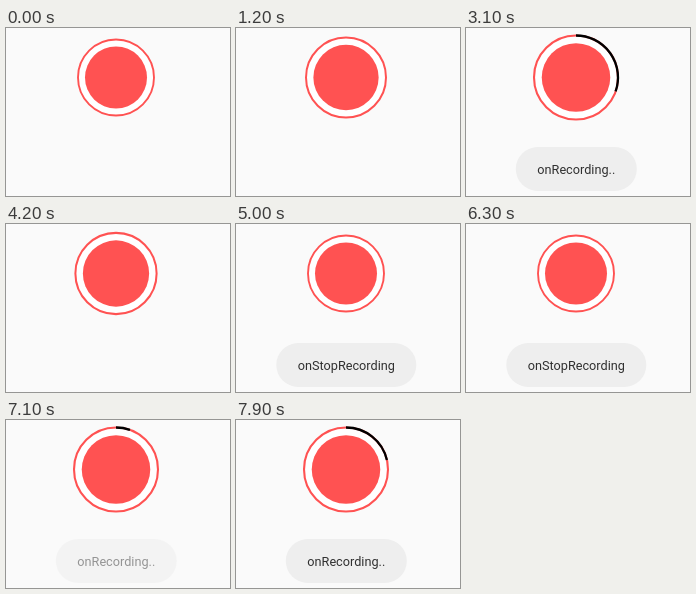
Write an HTML page that moves like this. It is 224 px wide and 168 px high and loops after 8 s.

```html
<!DOCTYPE html>
<html lang="en">
<head>
<meta charset="utf-8">
<title>Record button</title>
<style>
  html, body { margin: 0; width: 100%; height: 100%; overflow: hidden; background: #fafafa; }
  svg { display: block; width: 100vw; height: 100vh; }
  text { font: 12.7px Roboto, sans-serif; text-anchor: middle; fill: #303030; }
</style>
</head>
<body>
<svg viewBox="0 0 224 168">
  <g id="button">
    <circle r="38" fill="#fff" stroke="#ff5252" stroke-width="1.9"/>
    <circle r="31" fill="#ff5252"/>
    <path id="arc" fill="none" stroke="#000" stroke-width="2.1"/>
  </g>
  <g id="toast">
    <rect id="pill" y="119" height="44" rx="22" fill="#eee"/>
    <text id="label" x="110.3" y="145.6"></text>
  </g>
</svg>
<script>
const LOOP = 8000, TICK = 100, MAX_RECORDING = 5000, FADE = 400;
const PRESSED_SCALE = 1.105, RING = 38;

const presses = [
  { down: 1100, record: 1580, up: 4120 },
  { down: 6350, record: 6830, up: Infinity },
];
const toasts = [
  { text: 'onRecording..', width: 121, show: 1650, hide: 3750 },
  { text: 'onStopRecording', width: 140, show: 4250, hide: 6350 },
  { text: 'onRecording..', width: 121, show: 6900, hide: Infinity },
];

const el = id => document.getElementById(id);
const ramp = (t, start, length) => Math.min(1, Math.max(0, (t - start) / length));
const smooth = x => (1 - Math.cos(Math.PI * x)) / 2;

function drawButton(t) {
  let pressed = 0, sweep = 0;
  for (const { down, record, up } of presses) {
    pressed += smooth(ramp(t, down, 200)) - smooth(ramp(t, up, 200));
    if (t > record && t < up) sweep = (t - record) / MAX_RECORDING * 2 * Math.PI;
  }
  const scale = 1 + (PRESSED_SCALE - 1) * pressed;
  el('button').setAttribute('transform', `translate(110 49.5) scale(${scale})`);
  const x = RING * Math.sin(sweep), y = -RING * Math.cos(sweep);
  const large = sweep > Math.PI ? 1 : 0;
  el('arc').setAttribute('d', sweep ? `M0 ${-RING}A${RING} ${RING} 0 ${large} 1 ${x} ${y}` : '');
}

function drawToast(t) {
  const toast = toasts.find(({ show, hide }) => t > show && t < hide + FADE);
  el('toast').setAttribute('opacity',
    toast ? ramp(t, toast.show, FADE) - ramp(t, toast.hide, FADE) : 0);
  if (!toast) return;
  el('label').textContent = toast.text;
  el('pill').setAttribute('width', toast.width);
  el('pill').setAttribute('x', 110.3 - toast.width / 2);
}

function frame() {
  const t = Math.floor(performance.now() % LOOP / TICK) * TICK;
  drawButton(t);
  drawToast(t);
  requestAnimationFrame(frame);
}
frame();
</script>
</body>
</html>
```
